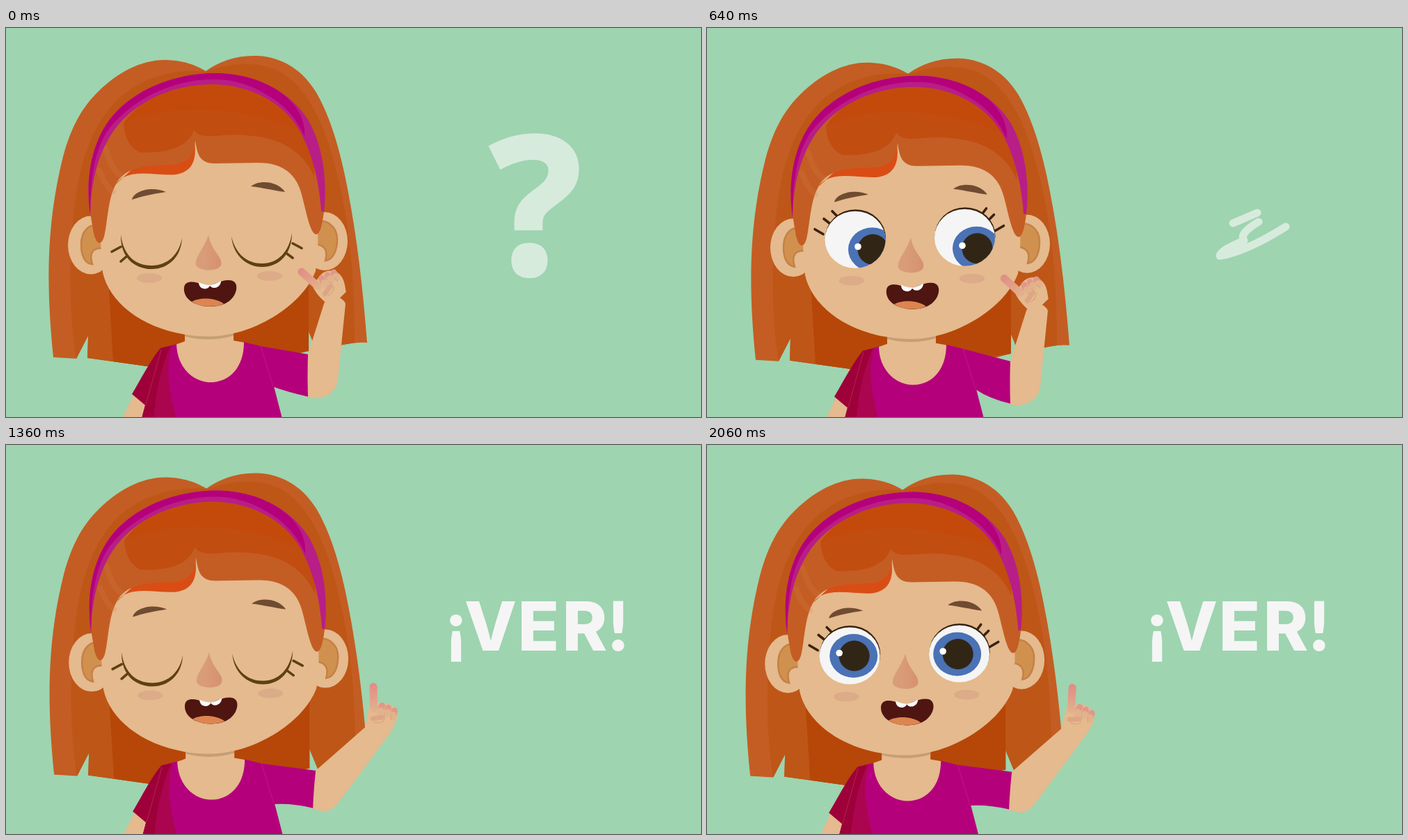
An HTML page for the animation above (2.14 s loop, 999 by 560 pixels).

```html
<!DOCTYPE html>
<html lang="es">
<head>
<meta charset="utf-8">
<title>¡VER!</title>
<style>
html, body { margin: 0; width: 100%; height: 100%; overflow: hidden; background: #9ed4b0; }
svg { display: block; width: 100vw; height: 100vh; }
.ask { font: 700 276px "Open Sans", sans-serif; fill: #d7ebdd; stroke: #d7ebdd; stroke-width: 5; }
.word { font: 800 98px Inter, sans-serif; fill: #f5f5f5; text-anchor: middle; }
.mark { font: 900 99px Lato, sans-serif; }
.lash { fill: none; stroke-width: 3.6; stroke-linecap: round; }
.brush { fill: none; stroke: #d7ebdd; stroke-linecap: round; stroke-linejoin: round; }
</style>
</head>
<body>
<svg viewBox="0 0 999 560" preserveAspectRatio="none">
<defs>
  <clipPath id="eyeball"><ellipse rx="43.5" ry="41"/></clipPath>
  <clipPath id="lidArea"><ellipse cy="-1" rx="45" ry="43.5"/></clipPath>
  <linearGradient id="finger" gradientUnits="userSpaceOnUse" x1="0" y1="-60" x2="0" y2="-24">
    <stop offset="0" stop-color="#e28d86"/><stop offset="1" stop-color="#e2b08b"/>
  </linearGradient>
  <linearGradient id="nose" x1="0" x2="1"><stop offset=".3" stop-color="#d99c79"/><stop offset="1" stop-color="#d59170"/></linearGradient>
</defs>
<rect width="999" height="560" fill="#9ed4b0"/>

<g id="girl">
  <!-- back hair -->
  <path fill="#c45d23" d="M68 474C55 350 62 265 82 185C95 138 111 113 132 92C160 64 195 45 231 46C255 47 272 53 287 62C307 48 331 39 361 40C400 42 428 63 446 93C473 140 487 205 497 265C508 330 514 390 519 453C506 452 496 454 484 456L447 466L435 437V465L400 470L300 500L203 487L117 475L118 443L101 476Z"/>
  <path fill="#be5617" d="M101 476C92 425 89 340 98 260C106 190 125 138 160 103C199 68 246 58 287 63C330 48 374 46 406 71C452 107 475 190 489 275C499 338 501 400 501 453L484 456L447 466L435 437V465L300 500L203 487L117 475L118 443Z"/>
  <path fill="#b64708" d="M146 345L154 480L203 487L300 500L400 470L435 465V345Z"/>
  <!-- neck, ears, face -->
  <path fill="#e4ba8e" d="M257 420H327V450L344 453V520H243V456L257 451Z"/>
  <path fill="#c69e74" d="M257 430H327V443Q292 453 257 444Z"/>
  <g fill="#e4ba8e">
    <ellipse cx="122" cy="312.5" rx="33" ry="42"/>
    <ellipse cx="458" cy="307" rx="33" ry="42"/>
  </g>
  <g fill="#d0914f" stroke="#c58046" stroke-width="2.5">
    <path d="M137 286C120 279 108 292 108 312C108 329 114 339 124 340C119 324 125 316 138 317"/>
    <path d="M443 281C460 272 476 286 476 304C476 322 469 334 459 335C463 321 459 312 443 311"/>
  </g>
  <path fill="#e4ba8e" d="M138 270C134 300 137 330 139 352C150 402 212 444 292 444C352 444 425 402 445 350C449 320 449 300 447 270C430 200 400 150 272 150C170 150 150 210 138 270Z"/>
  <!-- fringe -->
  <path fill="#d94d15" d="M158 225C175 200 215 213 243 211C264 208 275 195 271 164L255 175L190 195Z"/>
  <path fill="#c45d23" d="M121 266C120 180 150 100 230 80C300 65 375 75 420 130C448 165 456 215 457 264C455 280 452 297 446 297C437 297 431 262 425 240C418 212 400 194 362 194L300 195C279 195 275 183 272 162C270 188 258 197 230 197C190 198 169 204 158 225C146 246 146 280 141 300C137 314 130 312 126 296Z"/>
  <path fill="#c14d11" d="M169 137C170 158 178 172 192 179C235 181 262 170 270 147C282 164 308 150 350 155C397 158 428 180 443 214C447 160 405 85 300 79C240 78 195 100 169 137Z"/>
  <path fill="#c44a0c" d="M169 137C230 108 340 110 427 150C400 105 350 80 297 80C240 80 200 97 169 137Z"/>
  <path fill="none" stroke="#d08250" stroke-width="8" stroke-opacity=".2" stroke-linecap="round" d="M143 174Q153 207 166 213M134 205Q143 228 154 236"/>
  <!-- headband -->
  <path fill="#b81e87" d="M121 270C111 200 131 148 160 119C197 82 250 65 303 65C365 67 411 95 434 132C456 170 462 220 457 264L453 264C450 215 437 170 417 140C390 100 340 81 295 81C232 82 183 110 156 146C130 183 122 225 121 270Z"/>
  <path fill="#b5007b" d="M121 268C112 200 131 148 160 119C197 82 250 65 303 65C350 66 385 82 407 103C425 121 430 140 429 156C416 127 397 108 371 94C346 79 320 74 300 74C237 73 177 106 146 148C125 180 121 225 121 268Z"/>
  <!-- face details -->
  <g fill="#6f4b31">
    <path d="M181 247C184 234 210 227 230 236C210 239 197 242 181 247Z"/>
    <path d="M352 228C363 218 391 220 401 236C384 234 370 230 352 228Z"/>
  </g>
  <g fill="#dcab87"><ellipse cx="206" cy="360" rx="18" ry="7"/><ellipse cx="379" cy="357" rx="18" ry="7"/></g>
  <path fill="url(#nose)" d="M291 298C286 315 271 330 273 341C276 350 305 352 309 341C312 329 295 322 291 298Z"/>
  <g id="openEyes"></g>
  <g id="closedEyes">
    <path fill="#5f4010" d="M165 298C164 330 185 347 209 347C235 347 252 328 253 302C249 325 233 342 209 342C186 342 169 328 165 298ZM324 300C326 326 345 344 368 344C393 344 411 325 411 295C407 322 391 339 368 339C347 339 330 326 324 300Z"/>
    <path class="lash" stroke="#5f4010" d="M152 322L165 315M165 336L173 329M412 310L425 317M404 325L412 331"/>
  </g>
  <path fill="#4f1511" d="M256 373C258 363 270 364 285 370C296 373 305 363 320 363C333 363 333 375 329 383C322 397 307 401 292 401C268 400 254 388 256 373Z"/>
  <path fill="#dd8550" d="M267 394C278 387 302 388 313 397C300 403 279 402 267 394Z"/>
  <path fill="#fafafa" d="M277 366C277 377 290 378 293 371C297 377 309 374 309 364Q300 369 293 370Q285 370 277 366Z"/>
  <!-- shirt and far arm -->
  <path fill="#e4ba8e" d="M184 527L165 566H198L201 542Z"/>
  <path fill="#b5007b" d="M245 455C246 490 270 510 294 510C320 510 342 490 342 452L366 458L385 516L398 566H194L222 461Z"/>
  <path fill="#ab0550" d="M245 455L222 461L194 566H246C234 525 229 490 238 457Z"/>
  <path fill="#9e0039" d="M222 461C209 476 194 505 181 527L200 543L194 566H212Q216 505 236 458Z"/>
  <path fill="none" stroke="#b52e55" stroke-width=".8" d="M223 463L201 542"/>
</g>

<g id="arm">
  <path id="forearm" fill="#e4ba8e"/>
  <path id="sleeve" fill="#b5007b"/>
  <path id="seam" fill="none" stroke="#bd2188" stroke-width=".8" d="M366 458L384 516"/>
  <g id="hand">
    <path fill="#e4ba8e" d="M-16 8C-19-8-17-22-13-32L3-34C14-36 25-28 26-18C27-6 19 2 14 9Z"/>
    <g fill="none" stroke-linecap="round">
      <path stroke="url(#finger)" stroke-width="11" d="M-8-26L-9-57"/>
      <path stroke="#e0988a" stroke-width="9" d="M2-25L4-30M12-23L13-27M21-18L22-23"/>
      <path stroke="#e2b28b" stroke-width="9" d="M1-20L2-23M11-18L12-21M20-14L20-17"/>
      <path stroke="#dfa587" stroke-width="7" d="M-9-11L4-13"/>
      <path stroke="#d5a27d" stroke-width="1" d="M7-20L8-12M17-17L17-10M-7-6Q3-3 8-10"/>
    </g>
  </g>
</g>

<text id="ask" class="ask">?</text>
<path id="scribble" class="brush" d="M710 215L785 185L722 265L825 215L738 325L850 268"/>
<path id="remnant" class="brush" stroke-width="11" d="M756 281L791 266M793 279Q764 296 772 306Q738 320 737 328Q775 322 832 286"/>
<g id="word"></g>
</svg>

<script>
const LOOP = 2140, STEP = LOOP / 27;

const $ = id => document.getElementById(id);
const set = (el, attrs) => { for (const k in attrs) el.setAttribute(k, attrs[k]); };
const show = (el, on) => set(el, { visibility: on ? 'visible' : 'hidden' });
const clamp = v => Math.min(1, Math.max(0, v));
const mix = (a, b, u) => a + (b - a) * u;
const mixPoint = (p, q, u) => p.map((v, i) => mix(v, q[i], u));
const bump = (t, center, width) => Math.exp(-(((t - center) / width) ** 2));
const ease = (from, to, t) => {
  const u = clamp((t - from) / (to - from));
  return u * u * (3 - 2 * u);
};

const eyes = [
  { x: 211, y: 301, ahead: [5.5, 0], aside: [24.5, 14], lashes: 'M-58-15L-46-8M-45-30L-36-23M-33-41L-26-34' },
  { x: 368.5, y: 298, ahead: [-3, .5], aside: [17, 15.5], lashes: 'M44-10L56-17M35-26L42-33M25-34L31-42' }
];
$('openEyes').innerHTML = eyes.map(e => `<g transform="translate(${e.x} ${e.y})">
  <path class="lash" stroke="#3a2210" d="${e.lashes}"/>
  <ellipse cx=".5" cy="-2.5" rx="43.5" ry="41" fill="#3a2210"/>
  <ellipse rx="43.5" ry="41" fill="#f5f5f5"/>
  <g clip-path="url(#eyeball)"><g class="iris">
    <ellipse rx="34.5" ry="31.5" fill="#4a72b5"/>
    <circle cx="1" r="22" fill="#312616"/>
    <circle cx="-20.5" cy="-4" r="4.8" fill="#fff"/>
  </g></g>
  <g clip-path="url(#lidArea)"><path class="lid" fill="#e4ba8e" stroke="#4a3012" stroke-width="4"/></g>
</g>`).join('');
const irises = document.querySelectorAll('.iris');
const lids = document.querySelectorAll('.lid');

const letters = [
  { text: '¡', x: 647, y: 278, mark: true },
  { text: 'V', x: 696.5, y: 260.5 },
  { text: 'E', x: 765.5, y: 260.5 },
  { text: 'R', x: 832, y: 260.5 },
  { text: '!', x: 880, y: 260.5, mark: true }
];
$('word').innerHTML = letters.map(l =>
  `<text class="word${l.mark ? ' mark' : ''}" y="${296 - l.y}">${l.text}</text>`).join('');
const glyphs = [...$('word').children];

const bent = { top: [434, 470], inner: [457, 397], outer: [488, 397], elbow: [477, 506], bottom: [434, 531] };
const raised = { top: [444, 468], inner: [515, 406], outer: [555, 409], elbow: [480, 510], bottom: [440, 522] };

function drawArm(t) {
  const lift = ease(960, 1360, t);
  const drop = 6 * bump(t, 640, 180) - 4.5 * bump(t, 230, 130);
  const joint = name => {
    const [x, y] = mixPoint(bent[name], raised[name], lift);
    return [x, y + drop];
  };
  const [top, inner, outer, elbow, bottom] = ['top', 'inner', 'outer', 'elbow', 'bottom'].map(joint);
  const bend = mixPoint(outer, elbow, 1.2);
  const cuff = mixPoint(top, bottom, .5);
  const wrist = mixPoint(inner, outer, .5);
  const angle = -46 - 10 * bump(t, 230, 130) + 51 * ease(600, 1500, t);
  set($('forearm'), {
    d: `M${top[0] - 4} ${top[1]}L${top}L${inner}A17 17 0 0 1 ${outer}L${elbow}C${bend} ${bottom[0] + 18} ${bottom[1] + 7} ${bottom[0] - 3} ${bottom[1]}Z`
  });
  set($('sleeve'), {
    d: `M366 458L${top}Q${cuff[0] - 1} ${cuff[1]} ${bottom}Q${bottom[0] - 30} ${bottom[1] - 7} 384 516.5Z`
  });
  set($('hand'), { transform: `translate(${wrist[0]} ${wrist[1] - mix(13, 3, lift)}) rotate(${angle})` });
}

function drawEyes(t) {
  const openAround = center => clamp((Math.abs(t - center) - 50) / 115);
  const open = Math.min(openAround(35), openAround(1395));
  const look = 1 - ease(1300, 1900, t);
  show($('openEyes'), open > 0);
  show($('closedEyes'), open === 0);
  eyes.forEach((e, i) => {
    set(irises[i], { transform: `translate(${mixPoint(e.ahead, e.aside, look)})` });
    const edge = 25 - 60 * open;
    set(lids[i], {
      d: `M-60-60H60V${edge}Q0 ${edge + 24} -60 ${edge}Z`,
      display: open < 1 ? 'inline' : 'none'
    });
  });
}

function drawLettering(t) {
  show($('ask'), t < 460);
  set($('ask'), { transform: `translate(${696 - 2.5 * clamp(t / 230)} 354) scale(1 ${1 - t * .00019})` });
  show($('scribble'), t >= 460 && t < 620);
  set($('scribble'), { 'stroke-width': t < 540 ? 27 : 15 });
  show($('remnant'), t >= 620 && t < 700);
  const size = 1 - (1 - clamp((t - 710) / 480)) ** 4;
  show($('word'), size > 0);
  letters.forEach((l, i) => set(glyphs[i], { transform: `translate(${l.x} ${l.y}) scale(${size})` }));
}

function render(time) {
  // the picture is held for one step; steps begin slightly early
  const t = Math.floor((time % LOOP + 14) / STEP) % 27 * STEP;
  const swayX = 2 - 3.1 * bump(t, 150, 220) - 8 * ease(1150, 2150, t);
  const swayY = .5 - 3 * bump(t, 200, 150) + 3.6 * bump(t, 740, 330) + 2 * ease(1700, 2060, t);
  for (const part of ['girl', 'arm']) set($(part), { transform: `translate(${swayX} ${swayY})` });
  drawArm(t);
  drawEyes(t);
  drawLettering(t);
}

const start = performance.now();
function tick() {
  render(performance.now() - start);
  requestAnimationFrame(tick);
}
tick();
</script>
</body>
</html>
```
